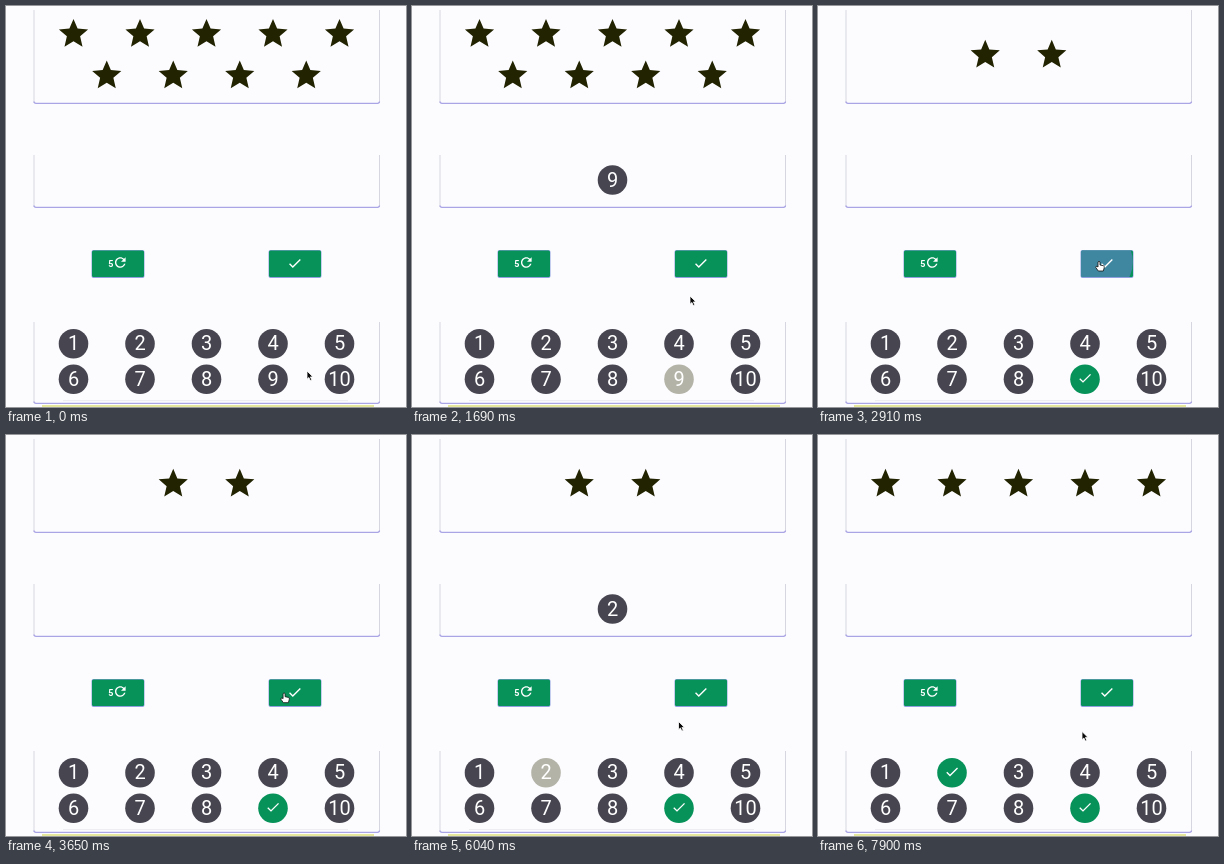
Recreate the animation shown at these times as an HTML page. Size 400 by 401 pixels, loop 8000 ms.

```html
<!DOCTYPE html>
<html lang="en">
<head>
<meta charset="utf-8">
<title>Star match</title>
<style>
  html, body { margin: 0; width: 100%; height: 100%; overflow: hidden; background: #fcfcff; }
  svg { display: block; width: 100vw; height: 100vh; }
  text { font-family: Roboto, sans-serif; fill: #fff; text-anchor: middle; }
</style>
</head>
<body>
<svg id="stage" viewBox="0 0 400 401">
  <defs>
    <path id="star" d="M12 17.27L18.18 21l-1.64-7.03L22 9.24l-7.19-.61L12 2 9.19 8.63 2 9.24l5.46 4.73L5.82 21z"/>
    <path id="check" d="M9 16.17L4.83 12l-1.42 1.41L9 19 21 7l-1.41-1.41z"/>
    <path id="refresh" d="M17.65 6.35C16.2 4.9 14.21 4 12 4c-4.42 0-7.99 3.58-7.99 8s3.57 8 7.99 8c3.73 0 6.84-2.55 7.73-6h-2.08c-.82 2.33-3.04 4-5.65 4-3.31 0-6-2.69-6-6s2.69-6 6-6c1.66 0 3.14.69 4.22 1.78L13 11h7V4l-2.35 2.35z"/>
    <clipPath id="buttonClip"><rect x="263" y="244.500" width="52" height="26.500" rx="1.500"/></clipPath>
  </defs>
  <rect width="400" height="401" fill="#fcfcff"/>
  <g id="panels"></g>
  <g id="stars" fill="#222300"></g>
  <g id="answer"></g>
  <g id="buttons"></g>
  <circle id="ripple" fill="#6880d4" clip-path="url(#buttonClip)"/>
  <g id="icons" fill="#fff"></g>
  <g id="tray"></g>
  <g id="arrow" stroke="#fff" stroke-width=".8" stroke-linejoin="round">
    <path d="M0 0V8.200L1.900 6.500L3.300 9.600L4.800 8.900L3.400 5.900H6z" fill="#080808"/>
  </g>
  <g id="hand" stroke="#111" stroke-width=".8" stroke-linejoin="round">
    <path d="M-1 1Q0-.6 1 1V4L4.400 4.700Q5.600 5 5.200 6.800L4.300 10H-.7L-3.200 6.500Q-3.300 5-2 5.300L-1 6z" fill="#fff"/>
  </g>
</svg>
<script>
const LOOP = 8000;
const GREEN = '#07925a', DARK = '#464550', PALE = '#b4b3a8';
const COLUMNS = [67.5, 134, 200.5, 267, 333.5];
const $ = id => document.getElementById(id);

// Clicks: pick a number, then confirm it.
const PICK_9 = 1000, CONFIRM_9 = 2640, PICK_2 = 5100, CONFIRM_2 = 6640;

// time, x, y of the pointer tip
const POINTER = [
  [0, 301, 365], [60, 301, 365], [680, 271, 370], [1120, 271, 370],
  [1690, 278, 290], [1790, 278, 290], [2400, 281, 255], [3490, 281, 255],
  [4210, 258, 276], [4310, 257, 277], [4450, 140, 334], [4730, 138, 337],
  [5300, 138, 337], [6040, 266.5, 286.5], [6500, 282, 262], [7740, 282, 262],
  [7900, 264, 296.5], [8000, 264, 296.5]
];

const clamp = v => Math.max(0, Math.min(1, v));
const smooth = v => v * v * (3 - 2 * v);

const icon = (name, x, y, size) =>
  `<use href="#${name}" transform="translate(${x - size / 2} ${y - size / 2}) scale(${size / 24})"/>`;

const disc = (x, y, fill, content) =>
  `<circle cx="${x}" cy="${y}" r="14.8" fill="${fill}"/>${content}`;

const numberDisc = (n, x, y, fill = DARK) =>
  disc(x, y, fill, `<text x="${x}" y="${y + 6.5}" font-size="20">${n}</text>`);

const checkDisc = (x, y) =>
  disc(x, y, GREEN, `<g fill="#fff">${icon('check', x, y - 1, 16)}</g>`);

function panel(top, bottom) {
  return `<path d="M28 ${top}V${bottom}M373.500 ${top}V${bottom}" stroke="#d6d6e0" fill="none"/>
    <path d="M28 ${bottom - 1.5}Q28 ${bottom + .3} 30 ${bottom + .3}H371.500Q373.500 ${bottom + .3} 373.500 ${bottom - 1.5}" stroke="#aaa5e5" stroke-width="1.300" fill="none"/>`;
}

function button(x) {
  return `<rect x="${x - .5}" y="244" width="53" height="28" rx="2" fill="#8f9fe0"/>
    <rect x="${x}" y="244.500" width="52" height="26.500" rx="1.500" fill="${GREEN}"/>`;
}

function starRow(count, y) {
  let out = '';
  for (let i = 0; i < count; i++)
    out += icon('star', 200.5 + (i - (count - 1) / 2) * 66.5, y, 35);
  return out;
}

function tray(state) {
  let out = '';
  for (let n = 1; n <= 10; n++) {
    const x = COLUMNS[(n - 1) % 5], y = n > 5 ? 373.2 : 337.8;
    out += state.done.includes(n) ? checkDisc(x, y)
      : numberDisc(n, x, y, n === state.picked ? PALE : DARK);
  }
  return out;
}

function stateAt(t) {
  if (t < CONFIRM_9) return { stars: 9, picked: t < PICK_9 ? 0 : 9, done: [] };
  if (t < CONFIRM_2) return { stars: 2, picked: t < PICK_2 ? 0 : 2, done: [9] };
  return { stars: 5, picked: 0, done: [9, 2] };
}

function pointerAt(t) {
  const i = POINTER.findIndex(k => k[0] > t);
  const [t0, x0, y0] = POINTER[i - 1], [t1, x1, y1] = POINTER[i];
  const e = smooth((t - t0) / (t1 - t0));
  return [x0 + (x1 - x0) * e, y0 + (y1 - y0) * e];
}

function drawRipple(t) {
  const second = t >= CONFIRM_2;
  const age = t - (second ? CONFIRM_2 : CONFIRM_9);
  const on = age >= 0 && age < 730;
  const ripple = $('ripple');
  ripple.setAttribute('cx', second ? 282 : 281);
  ripple.setAttribute('cy', second ? 262 : 256);
  ripple.setAttribute('r', on ? 38 * (1 - (1 - clamp(age / 450)) ** 2.4) : 0);
  ripple.setAttribute('opacity', .58 * (1 - clamp((age - 400) / 320)));
}

let shown = '';
function drawBoard(state) {
  const key = JSON.stringify(state);
  if (key === shown) return;
  shown = key;
  $('stars').innerHTML = state.stars > 5
    ? starRow(5, 27.5) + starRow(state.stars - 5, 69)
    : starRow(state.stars, 48.3);
  $('answer').innerHTML = state.picked ? numberDisc(state.picked, 200.5, 174) : '';
  $('tray').innerHTML = tray(state);
}

function drawPointer(t) {
  const [x, y] = pointerAt(t);
  const overButton = x > 263 && x < 315 && y > 244 && y < 271;
  for (const id of ['arrow', 'hand']) {
    $(id).setAttribute('transform', `translate(${x} ${y})`);
    $(id).style.display = (id === 'hand') === overButton ? '' : 'none';
  }
}

function draw(t) {
  drawBoard(stateAt(t));
  drawRipple(t);
  drawPointer(t);
}

$('panels').innerHTML = panel(4, 97) + panel(149, 201) + panel(316, 397) +
  '<rect x="36" y="399" width="332" height="2" fill="#e4e79c"/>' +
  '<path d="M57 394.700H342" stroke="#e6e6ea" stroke-width=".8"/>';
$('buttons').innerHTML = button(86) + button(263);
$('icons').innerHTML = '<text x="104.800" y="260.500" font-size="9" font-weight="700">5</text>' +
  icon('refresh', 114.3, 256.5, 16) + icon('check', 288.8, 257.3, 16);

const start = performance.now();
function frame() {
  draw((performance.now() - start) % LOOP);
  requestAnimationFrame(frame);
}
frame();
</script>
</body>
</html>
```
